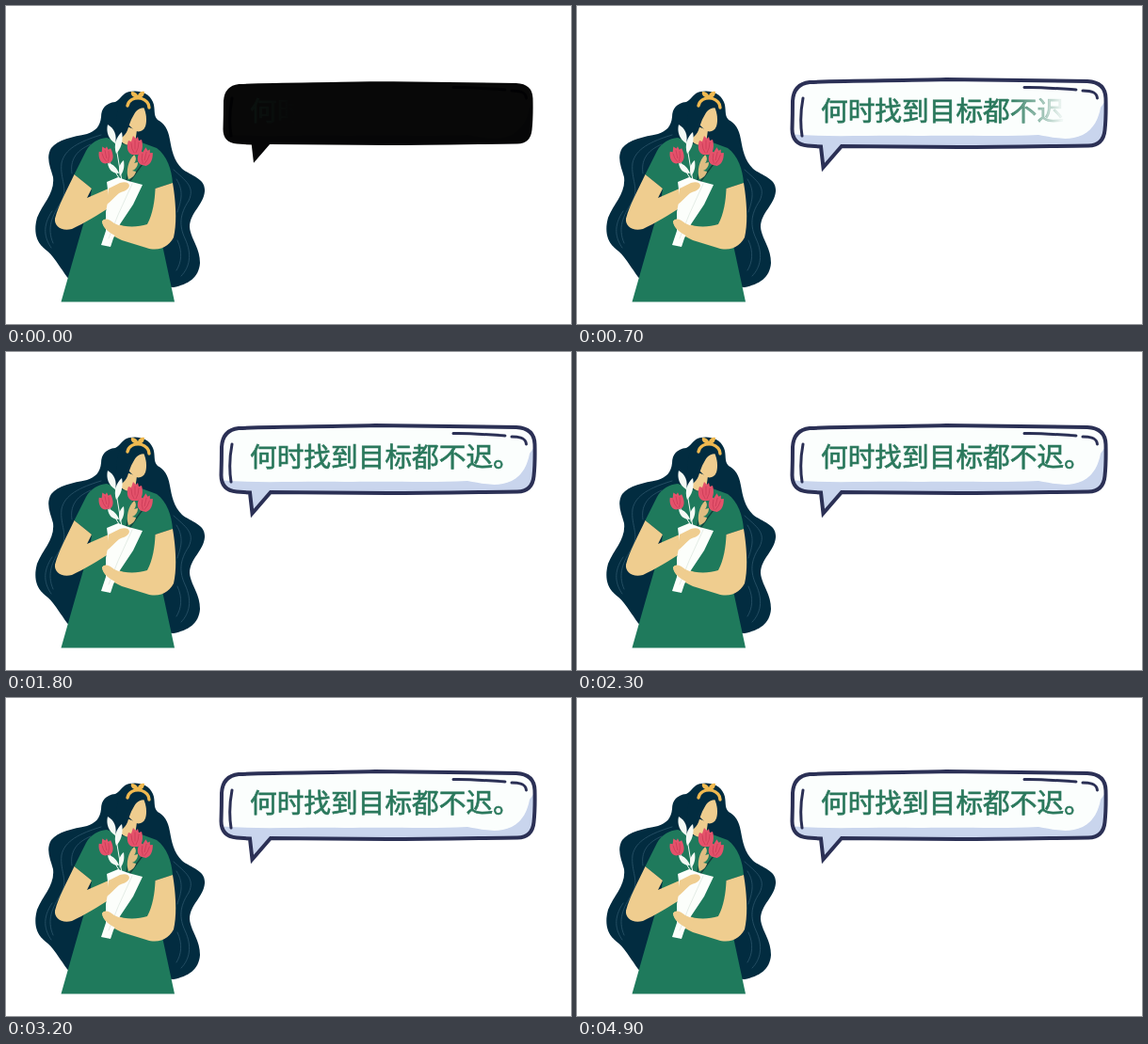
An HTML page that plays this animation: 600x338 px, repeating every 5 s.

```html
<!DOCTYPE html>
<html lang="zh-CN">
<head>
<meta charset="utf-8">
<style>
  html, body { margin: 0; width: 100%; height: 100%; overflow: hidden; background: #fff; }
  svg { display: block; width: 600px; height: 338px; }
  .line { fill: none; stroke-linecap: round; stroke-linejoin: round; }
  text { font: 500 28.7px "Noto Sans CJK SC", "Noto Sans CJK", "Noto Sans CJK JP", sans-serif; }
</style>
</head>
<body>
<svg viewBox="0 0 600 338">
  <defs>
    <linearGradient id="wipe" gradientUnits="userSpaceOnUse" y1="0" y2="0">
      <stop offset="0" stop-color="#2a785c"/>
      <stop offset="1" stop-color="#2a785c" stop-opacity="0"/>
    </linearGradient>
    <path id="shape" d="M247 81C290 79 340 79.500 392 78C450 78.500 500 79 542 80Q561 81 561.500 98Q562 118 560.500 132Q559 148 543 148.500C500 149 450 150 405 150C360 150 320 149 281 149L261.500 171.500L259 149.500L245 148.500Q228.500 147 228.500 131Q229 115 229 101Q230 83 247 81Z"/>
    <clipPath id="inside"><use href="#shape"/></clipPath>
    <g id="bloom">
      <path fill="#e4526b" d="M-3 10C-9 8-9 0-7-5L-4-4L-2-10L1-7L3-9L4-5L7-6C9 1 8 8 3 10Z"/>
      <path class="line" stroke="#c93a56" stroke-width=".8" d="M-4-2Q-4 4-1 8M4-3Q4 3 1 8M0-5V4"/>
    </g>
  </defs>

  <g id="woman">
    <path fill="#022c40" d="M131 91C124 92 122 99 116 102C106 103 101 109 101 118C100 128 95 133 86 136C71 139 55 142 48 151C42 161 47 171 50 182C52 199 39 210 33 225C29 240 32 251 42 259C50 265 54 273 60 281C63 286 66 290 70 293L178 299C193 296 205 289 206 273C206 257 196 247 195 235C195 220 210 211 211 197C212 183 197 181 187 173C178 164 176 153 174 142C172 130 168 125 161 121C156 116 159 109 156 102C152 92 141 89 131 91Z"/>
    <g class="line" stroke="#2d566b" stroke-width=".8">
      <path d="M101 137C78 144 62 152 59 167C57 185 67 194 58 209C49 223 43 236 50 252"/>
      <path d="M90 147C73 154 68 165 70 178M49 218C38 234 41 247 48 257"/>
      <path d="M178 174C191 186 201 192 194 207C184 222 184 234 190 247C198 264 195 278 186 287"/>
      <path d="M181 184C190 198 185 209 182 219M182 249C188 262 186 273 181 281"/>
    </g>

    <path fill="#1f7a5c" d="M107 140C98 141 90 145 85 154L72.500 179L91 194L89 208L76 253L58.500 314.500H179L166 254L158.500 194L177 188C176 174 171 159 160 151L141 144L131 149Z"/>
    <path fill="#efcd8f" d="M128 128L121 142Q127 151 137 146L139 132Z"/>
    <path fill="#efcd8f" d="M134 106L146 107C149 114 150 121 148 128C146 133 141 135 136 132L130 126Z"/>
    <path fill="#022c40" d="M121 104C127 97 142 97 149 108C141 108 138 111 135 117C132 122 131 126 129 132C126 139 121 142 114 143C119 130 115 117 121 104Z"/>
    <path class="line" stroke="#f0b950" stroke-width="3.400" d="M129 106C130 100 136 97 143 98C149 100 152 103 152 108"/>
    <path fill="#f0b950" d="M140 98C135 97 132 95 133 91C137 91 139 93 140 95C141 92 144 90 147 91C147 95 145 98 140 98Z"/>

    <path fill="#efcd8f" d="M72.500 179L91 194L86 204L118 190C124 186 130 187 131 191C131 196 122 205 113 212C98 222 83 231 70 237C59 240 51 234 52 226C56 211 65 195 72.500 179Z"/>
    <path fill="#efcd8f" d="M158.500 194L177 188C180 205 182 229 178 246C172 257 161 261 149 257L123 249C112 244 103 237 102 229C105 224 110 228 116 231C128 236 140 235 150 232C156 221 158 207 158.500 194Z"/>

    <g class="line" stroke="#113f3b" stroke-width="1.300">
      <path d="M137 153L127 188M147 165L131 187"/>
    </g>
    <path class="line" stroke="#f5faf5" stroke-width="1" d="M116 144L123 186M108 163L122 186"/>
    <g fill="#f5faf5">
      <path d="M108 126C115 130 118 137 116 146C109 142 106 134 108 126Z"/>
      <path d="M123 134C125 143 122 152 117 157C114 148 117 139 123 134Z"/>
      <path d="M108 167C114 168 118 172 120 178C113 178 109 174 108 167Z"/>
      <path d="M125 164C126 171 125 176 121 181C119 174 120 168 125 164Z"/>
    </g>
    <path fill="#dfbd82" d="M136 158C139 161 138 165 136 167L140 166C140 171 137 174 134 175L138 176C137 180 134 183 130 184C127 175 130 164 136 158Z"/>
    <use href="#bloom" x="137" y="148"/>
    <use href="#bloom" transform="translate(106 158) rotate(-12) scale(.92)"/>
    <use href="#bloom" transform="translate(148 160) rotate(14) scale(.95)"/>

    <path fill="#fcfefb" d="M107 187L119 182L130 186L145 190L135 211L121 232L114 247L111 256L101 254L106 239L106 219L109 203Z"/>
    <path class="line" stroke="#d9e4dc" stroke-width=".7" d="M134 189L119 222L109 247"/>
    <path fill="#efcd8f" d="M109 194L121 188C127 186 131 188 131 191C130 196 124 197 120 199C115 203 111 208 107 211Z"/>
    <path fill="#efcd8f" d="M102 229C105 224 110 227 115 231L124 235L120 246C111 242 103 237 102 229Z"/>
  </g>

  <g id="bubble">
    <g clip-path="url(#inside)">
      <use href="#shape" fill="#fbfefd"/>
      <path fill="#c9d5ed" d="M226 136C265 140 310 137 360 138C410 137 450 139 490 137C507 140 522 144 537 137C549 131 554 119 556 108L563 98V180H226Z"/>
    </g>
    <g class="line" stroke="#2b3055" stroke-width="3">
      <path d="M475 86.500C493 86 513 88 530 89M537 90C547 90 552 92 552.500 98M240 98Q236 119 239 138"/>
    </g>
  </g>
  <use id="edge" href="#shape" fill="none" stroke-width="4" stroke-linejoin="miter"/>
  <text id="words" x="259" y="121.500" fill="url(#wipe)" stroke="url(#wipe)" stroke-width=".7">何时找到目标都不迟。</text>
</svg>
<script>
const LOOP = 5000, STEP = 100, SOFT = 62;
const $ = id => document.getElementById(id);
const wipe = $("wipe"), bubble = $("bubble"), edge = $("edge"), words = $("words");

// Tables of [time, value], joined by straight lines.
const light = [[0, .03], [300, .63], [500, 1]];
const front = [[0, 310], [300, 406], [700, 518], [1100, 612]];
const ink = [[0, .1], [300, 1]];

function at(steps, t) {
  const i = steps.findIndex(s => s[0] > t);
  if (i < 0) return steps[steps.length - 1][1];
  const [t0, a] = steps[i - 1], [t1, b] = steps[i];
  return a + (b - a) * (t - t0) / (t1 - t0);
}

function draw(time) {
  const t = Math.floor(time % LOOP / STEP) * STEP;
  const shade = `brightness(${at(light, t)})`;
  const x = at(front, t);
  bubble.style.filter = shade;
  edge.style.filter = t ? shade : "none";
  edge.setAttribute("stroke", t ? "#2b3055" : "#fff");
  words.setAttribute("opacity", at(ink, t));
  wipe.setAttribute("x1", x - SOFT);
  wipe.setAttribute("x2", x);
}

const start = performance.now();
function tick() {
  draw(performance.now() - start);
  requestAnimationFrame(tick);
}
tick();
</script>
</body>
</html>
```
